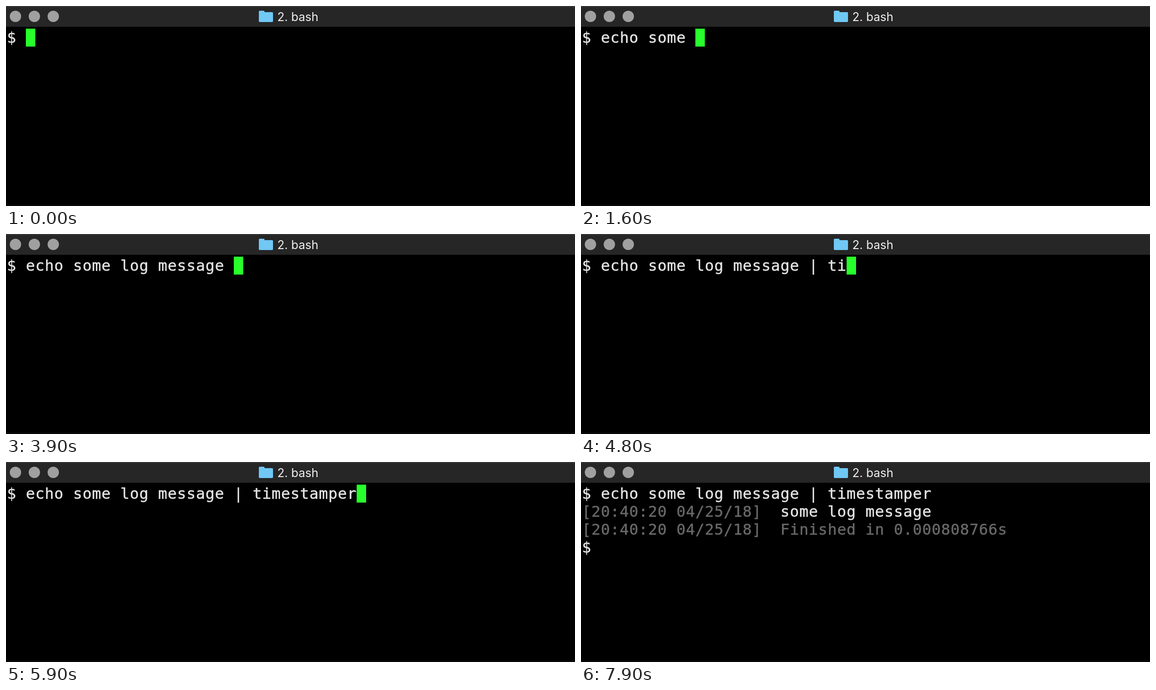
Recreate the animation shown at these times as an HTML page with a canvas. Size 1204x424 px, loop 8 s.

```html
<!DOCTYPE html>
<html lang="en">
<head>
<meta charset="utf-8">
<title>Terminal</title>
<style>
  html, body { margin: 0; width: 100%; height: 100%; overflow: hidden; background: #000; }
  canvas { display: block; }
</style>
</head>
<body>
<canvas id="stage" width="1204" height="424"></canvas>
<script>
const ctx = document.getElementById('stage').getContext('2d');
const LOOP = 8000, TICK = 100;
const CELL = { left: 2, top: 48, width: 20, height: 38 };
const BRIGHT = '#e4e4e4', DIM = '#686868', GREEN = '#28fe2c';

const COMMAND = 'echo some log message | timestamper';
const STAMP = '[20:40:20 04/25/18]';
const OUTPUT_AT = 6200, BLINK = 500;

// [time in ms, characters typed], linear in between
const TYPING = [[300, 0], [1600, 10.4], [2800, 16.4], [3900, 22.4], [4800, 26.4], [5750, 35]];

function typedCount(t) {
  const next = TYPING.findIndex(([time]) => time > t);
  if (next === 0) return 0;
  if (next < 0) return COMMAND.length;
  const [t0, n0] = TYPING[next - 1], [t1, n1] = TYPING[next];
  return Math.floor(n0 + (n1 - n0) * (t - t0) / (t1 - t0));
}

function rect(x, y, w, h, color) {
  ctx.fillStyle = color;
  ctx.fillRect(x, y, w, h);
}

// Each character sits in its own terminal cell.
function write(text, row, col, color) {
  ctx.font = '32px "DejaVu Sans Mono", monospace';
  ctx.fillStyle = ctx.strokeStyle = color;
  ctx.lineWidth = 0.5;
  [...text].forEach((char, i) => {
    const x = CELL.left + (col + i) * CELL.width;
    const y = CELL.top + 30 + row * CELL.height;
    ctx.fillText(char, x, y);
    ctx.strokeText(char, x, y);
  });
}

function cursor(row, col) {
  rect(CELL.left + col * CELL.width, CELL.top + row * CELL.height, CELL.width, CELL.height, GREEN);
}

function titleBar() {
  rect(0, 0, 1204, 44, '#262626');
  rect(0, 0, 1204, 2, '#383838');
  ctx.fillStyle = '#a0a0a0';
  for (const x of [20, 60, 100]) {
    ctx.beginPath();
    ctx.arc(x, 22, 12, 0, Math.PI * 2);
    ctx.fill();
  }
  ctx.fillStyle = '#70c8f4';
  ctx.beginPath();
  ctx.roundRect(535, 10, 12, 8, 2);
  ctx.roundRect(535, 13, 30, 21, 2);
  ctx.fill();
  ctx.font = '25px Inter, sans-serif';
  ctx.fillStyle = '#efefef';
  ctx.fillText('2. bash', 574, 32);
}

function draw(t) {
  rect(0, 0, 1204, 424, '#000');
  rect(0, 420, 1204, 4, '#080808');
  titleBar();

  const typed = typedCount(t);
  write('$ ' + COMMAND.slice(0, typed), 0, 0, BRIGHT);
  if (t < OUTPUT_AT) {
    cursor(0, 2 + typed);
    return;
  }
  write(STAMP, 1, 0, DIM);
  write('some log message', 1, 21, BRIGHT);
  write(STAMP, 2, 0, DIM);
  write('Finished in 0.000808766s', 2, 21, DIM);
  write('$', 3, 0, BRIGHT);
  if (Math.floor((t - OUTPUT_AT) / BLINK) % 2 === 0) cursor(3, 2);
}

function frame() {
  const t = performance.now() % LOOP;
  draw(Math.floor(t / TICK) * TICK);
  requestAnimationFrame(frame);
}
frame();
</script>
</body>
</html>
```
